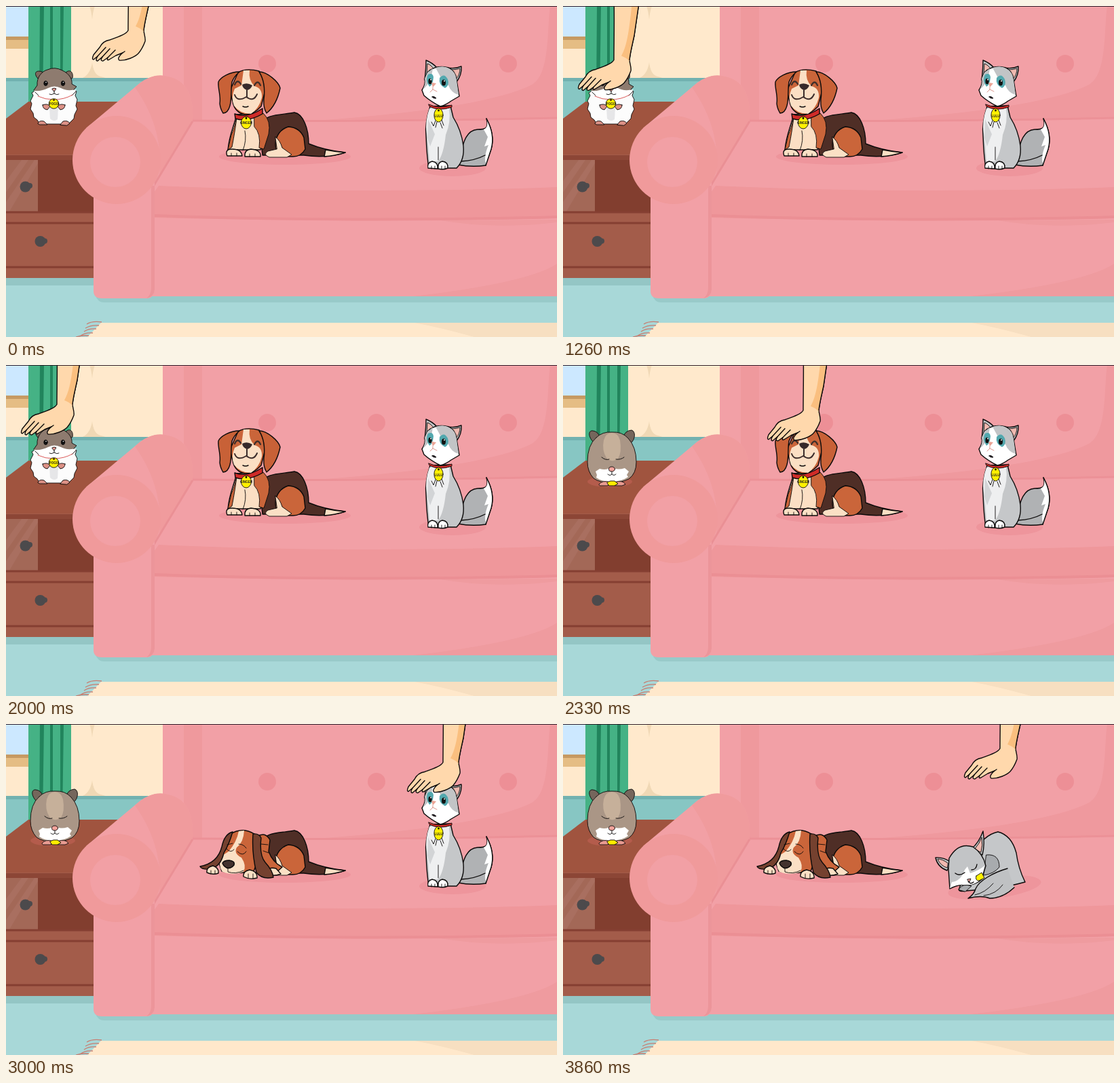
These frames come from a looping animation (812x488 px, 4800 ms). An HTML page:

```html
<!DOCTYPE html>
<html lang="en">
<head>
<meta charset="utf-8">
<title>Sleepy pets</title>
<style>
html, body { margin: 0; width: 100%; height: 100%; overflow: hidden; }
svg { display: block; width: 100%; height: 100%; }
.ink { stroke: #0c0a0a; stroke-width: 1.4; stroke-linejoin: round; stroke-linecap: round; }
.line { fill: none; }
.thin { stroke-width: .9; }
text { font: bold 4.6px Arial, "Liberation Sans", sans-serif; text-anchor: middle; fill: #222; stroke: none; }
</style>
</head>
<body>
<svg viewBox="0 0 812 488" preserveAspectRatio="none">
  <!-- Room -->
  <rect width="812" height="488" fill="#a8d8d8"/>
  <rect width="240" height="108" fill="#ffe9cc"/>
  <rect width="34" height="46" fill="#cce8ff"/>
  <rect y="45" width="34" height="18" fill="#e5bd84"/>
  <rect y="45" width="34" height="5" fill="#c69a63"/>
  <path d="M123 0H131Q128 8 127 20Q126 8 123 0ZM110 107Q124 103 127 83Q129 102 140 104L150 107Z" fill="#f0d8b5"/>
  <rect y="107" width="240" height="60" fill="#87c6c3"/>
  <rect y="106" width="240" height="5" fill="#72b2b0"/>
  <rect x="33" width="63" height="150" fill="#45b285"/>
  <path d="M50 0H56L54 141H49ZM65 0H69V141H65ZM80 0H85L83 141H80Z" fill="#21845c"/>
  <rect y="400" width="135" height="12" fill="#94c6c5"/>
  <path d="M132 427H812V437H145Q135 437 132 427Z" fill="#98cac9"/>
  <path d="M140 467H812V488H120Z" fill="#ffe8cb"/>
  <path d="M602 467H812V488H690Q640 474 602 467Z" fill="#f7dfc1"/>
  <path d="M141 466Q127 464 119 469M137 471Q125 470 117 475M133 476Q122 475 115 480M128 482Q116 481 109 487M122 486Q112 485 103 488" fill="none" stroke="#c77d70" stroke-width="1.3"/>

  <!-- Cabinet -->
  <path d="M0 166L33 141H170V220H0Z" fill="#a0543f"/>
  <rect y="219" width="135" height="182" fill="#a35c4a"/>
  <rect y="220" width="135" height="7" fill="#8c4636"/>
  <rect y="227" width="47" height="76" fill="#a36857"/>
  <path d="M0 258L23 227H33L0 275ZM0 289L42 227H47V232L5 303H0Z" fill="#a96f60"/>
  <rect x="47" y="227" width="88" height="76" fill="#823e2f"/>
  <path d="M0 304H135M0 320H135M0 385H135" stroke="#853f32" stroke-width="3"/>
  <g fill="#4c4a4c"><circle cx="28.500" cy="266.500" r="8"/><circle cx="35" cy="265" r="4"/><circle cx="50.500" cy="347" r="8"/><circle cx="57" cy="346.500" r="4"/></g>

  <!-- Sofa -->
  <path d="M231 0H812V428H210V170H231Z" fill="#f2a0a6"/>
  <path d="M262 0H289V168H262Z" fill="#ef999d"/>
  <path d="M812 0V165L470 168C600 158 720 143 775 116C802 101 797 35 802 0Z" fill="#ef999e"/>
  <path d="M275 169Q550 171 812 165" fill="none" stroke="#ec9197" stroke-width="3"/>
  <g fill="#ed8f96"><circle cx="385" cy="85" r="13"/><circle cx="546" cy="85" r="13"/><circle cx="740" cy="85" r="13"/></g>
  <path d="M225 265Q520 278 812 267V313Q520 320 218 312V275Z" fill="#ef979b"/>
  <path d="M218 309Q520 319 812 311" fill="none" stroke="#eb8f94" stroke-width="4"/>
  <path d="M812 380Q770 408 600 428H812Z" fill="#ef9b9f"/>
  <path d="M640 316Q720 330 812 319V315Z" fill="#ef9b9f"/>
  <path d="M118 180L198 113Q217 99 239 104Q278 112 275 169L216 267L150 290Z" fill="#f2a0a5"/>
  <path d="M190 120Q215 97 239 104Q278 112 275 169L226 250Q233 180 190 120Z" fill="#f09b9d"/>
  <path d="M275 170L217 266" stroke="#ea9095" stroke-width="3"/>
  <path d="M129 240H219V418Q218 431 207 431H141Q129 431 129 420Z" fill="#f2a0a6"/>
  <path d="M214 265H219V418Q218 429 207 431Q214 426 214 415Z" fill="#ec959a"/>
  <circle cx="163" cy="227" r="65" fill="#f09a9b"/>
  <circle cx="161" cy="230" r="37" fill="#f2a0a5"/>

  <!-- Hamster -->
  <g id="hamsterAwake" class="ink thin">
    <path d="M46 123L38 128L40 132L36 140L38 144L36 152L40 158L41 164L46 168L50 174H92L100 166L101 160L105 152L103 147L105 138L102 132L104 126L97 120Z" fill="#fcfcfc"/>
    <path d="M64 150H77L76 167Q70 172 65 166Z" fill="#e6e6e8" stroke="none"/>
    <path d="M47 107C40 99 44 94 53 97L58 104M86 101C91 92 100 95 98 106L93 110" fill="#7d6a5e"/>
    <path d="M41 124L46 117C45 105 53 96 61 94Q72 89 83 95C94 100 98 109 97 115L104 119L98 125Q90 132 71 133Q52 133 43 127Z" fill="#8e7b6f"/>
    <path d="M41 125Q53 126 62 121Q71 116 81 121Q89 126 104 123L96 132Q84 138 71 134Q55 138 45 131Z" fill="#fff" stroke="none"/>
    <path d="M71 126V129Q67 132 64 130M71 129Q75 132 78 130M43 127L48 132M103 126L97 132" class="line"/>
    <ellipse cx="58.500" cy="114" rx="2.700" ry="3.500" fill="#111"/><ellipse cx="84" cy="114" rx="2.700" ry="3.500" fill="#111"/>
    <circle cx="59" cy="112.500" r=".8" fill="#fff" stroke="none"/><circle cx="84.500" cy="112.500" r=".8" fill="#fff" stroke="none"/>
    <path d="M68 122Q71 120 74 122L71 126Z" fill="#ed9b94"/>
    <path d="M47 133Q58 138 70 138Q86 138 98 131" class="line" style="stroke:#d94a4a"/>
    <path d="M54 146Q61 143 65 148L61 153Q54 152 54 146ZM87 146Q80 143 76 148L80 153Q87 152 87 146ZM47 173Q49 168 56 170L61 175H50ZM80 175L84 170Q91 168 94 173L90 176Z" fill="#dc9186"/>
    <circle cx="70.500" cy="144" r="7.300" fill="#fff000"/><circle cx="70.500" cy="138.500" r="1" fill="#b52c26"/>
    <text x="70.500" y="146">POGO</text>
  </g>
  <g id="hamsterAsleep" class="ink thin">
    <ellipse cx="69" cy="172" rx="33" ry="8" fill="#b45c4c" stroke="none"/>
    <path d="M44 113C36 104 38 96 44 97Q52 98 54 106ZM89 106Q91 97 101 96C108 98 106 111 100 115Z" fill="#75665c"/>
    <path d="M49 107Q58 98 72 99Q87 98 96 108Q108 121 108 143Q108 160 97 168Q85 174 72 173Q54 174 45 167Q36 157 36 143Q36 118 49 107Z" fill="#aa9686"/>
    <path d="M60 111Q63 100 72 100Q81 100 84 111Q87 129 81 138Q73 145 64 137Q57 126 60 111Z" fill="#c6b09a" stroke="none"/>
    <path d="M50 162L48 157L54 153Q65 156 71 150Q79 156 91 152L97 157L94 162L96 165Q86 172 72 172Q57 172 49 166Z" fill="#fff" stroke="none"/>
    <path d="M53 176Q58 169 70 173L66 178H55ZM76 173Q88 169 92 176L87 178H76Z" fill="#e99b91"/>
    <path d="M65 173L70 171L76 171L81 175L76 178H68Z" fill="#ffec00"/>
    <path d="M57 136Q63 141 68 139M78 139Q85 140 90 136M72 156V161Q69 164 66 161M72 161Q75 164 78 161" class="line"/>
    <ellipse cx="72" cy="153.500" rx="4.500" ry="3.500" fill="#f2a29a"/>
  </g>

  <!-- Dog -->
  <ellipse cx="411" cy="222" rx="97" ry="12" fill="#ee959c"/>
  <g class="ink">
    <path d="M373 176C382 158 407 161 425 157C438 159 446 181 446 203Q470 213 500 216Q471 225 439 220H378Z" fill="#4f2e26"/>
    <path d="M471 212Q486 215 500 216Q485 221 469 222Z" fill="#fbe0c5"/>
    <path d="M397 205C397 190 406 181 416 178Q433 179 439 194L441 211Q435 222 423 222H400Z" fill="#ca653a"/>
    <path d="M397 193Q404 198 407 209L421 219L414 223H388Q378 219 386 214L399 211Z" fill="#fbe0c5" class="thin"/>
  </g>
  <g id="dogAwake" class="ink">
    <path d="M340 160C335 180 329 190 327 212H375L386 178L377 158Z" fill="#fbdfc4"/>
    <path d="M340 164Q336 182 332 190L327 212L333 208Q338 182 340 164ZM366 163L379 158Q391 169 387 189L380 211L373 209Q376 188 366 178Z" fill="#ca653a" class="thin"/>
    <path d="M326 221Q322 211 333 211Q347 211 348 221ZM352 222Q351 212 361 211Q376 212 375 222Z" fill="#fbe0c5"/>
    <path d="M332 217V221M340 217V221M359 218V222M367 218V222M349 213Q355 198 352 184" class="line thin"/>
    <path d="M337 159Q356 166 378 151L378 159Q356 172 338 166Z" fill="#cf2b28"/>
    <path d="M342 98Q354 91 373 96Q382 108 381 128L376 148Q365 160 352 160Q337 157 334 141L330 125Z" fill="#ca653a"/>
    <path d="M350 95L359 95Q357 109 366 118Q378 121 377 135Q373 151 361 159Q345 159 336 147Q331 135 337 122L347 117Z" fill="#fbdfc4" stroke="none"/>
    <path d="M344 97C330 97 316 105 313 112C312 122 317 132 315 144Q316 152 320 158Q327 158 330 147C333 136 331 122 333 112Q336 104 344 97ZM373 97C385 97 402 112 404 121C401 136 394 150 384 158Q379 150 380 138C382 122 380 108 373 97Z" fill="#c86137"/>
    <path d="M337 116Q341 107 346 115M366 117Q371 108 375 117" class="line" style="stroke:#41302b;stroke-width:2.300"/>
    <path d="M348 116Q355 112 363 117Q360 124 355 124Q349 122 348 116Z" fill="#36292a" stroke="none"/>
    <path d="M337 131Q341 142 354 134Q365 142 370 130M355 124V134" class="line" style="stroke:#3c2d2b;stroke-width:2"/>
    <path d="M349 148Q353 150 357 148" class="line"/>
    <ellipse cx="354" cy="172" rx="7.500" ry="9" fill="#fff000" class="thin"/><circle cx="354" cy="165.500" r=".7"/>
    <text x="354" y="174">GINGER</text>
  </g>
  <g id="dogAsleep" class="ink">
    <path d="M370 166Q382 158 389 171L387 188Q393 204 407 211L397 220H372Z" fill="#ca653a"/>
    <path d="M376 177L386 178M379 187L387 190" class="line thin"/>
    <path d="M384 219Q386 210 398 213L405 221Q395 225 384 222Z" fill="#fbe0c5"/>
    <path d="M330 163Q347 151 366 162L374 194L365 217Q338 222 318 217L313 203L321 182Z" fill="#ca653a"/>
    <path d="M343 158L351 157Q350 175 340 182Q335 191 347 197Q355 209 350 218Q334 224 319 218Q312 208 317 195L328 188Q340 174 343 158Z" fill="#fbe0c5" stroke="none"/>
    <path d="M334 159Q322 162 318 181Q312 205 286 210Q288 215 302 214Q317 209 321 190Q329 177 334 159ZM364 162Q373 161 376 168Q373 193 382 204Q393 216 394 226Q378 230 369 219Q362 190 364 162Z" fill="#75412f"/>
    <path d="M296 219Q295 211 305 209Q314 212 313 220Q305 223 296 219ZM350 225Q349 217 359 215Q371 217 370 227Q359 230 350 225Z" fill="#fbe0c5"/>
    <path d="M302 216V220M308 216V221M357 221V227M364 221V228M325 184Q331 191 336 185M341 188Q349 196 354 188M326 178L334 176M343 177Q350 177 354 183M327 210V218Q338 222 350 216" class="line thin"/>
    <path d="M319 205Q321 201 329 201Q338 202 336 208Q331 214 325 212Q320 209 319 205Z" fill="#43322e"/>
  </g>

  <!-- Cat -->
  <g id="catAwake" class="ink">
    <ellipse cx="658" cy="239" rx="49" ry="12" fill="#ee959c" stroke="none"/>
    <path d="M668 224C674 201 678 183 695 182C706 182 712 181 708 166Q721 190 715 211L707 235Q686 238 666 234Z" fill="#b0b2b4"/>
    <path d="M704 182Q712 178 708 166Q721 190 715 211L708 234Q703 224 711 205L705 207L710 193Z" fill="#fff" stroke="none"/>
    <path d="M670 229Q691 228 706 220M708 166Q721 190 715 211L707 235" class="line"/>
    <path d="M625 148Q617 173 619 191Q620 220 623 239H664Q676 227 674 206Q671 183 659 164L655 147Z" fill="#c5c7c9"/>
    <path d="M624 151H653Q656 171 648 190Q645 218 637 229H624Q623 208 620 188Q617 170 624 151Z" fill="#eeeff0" stroke="none"/>
    <path d="M622 167L632 189L625 207L621 194Z" fill="#d2d4d6" stroke="none"/>
    <path d="M637 208V227M627 171L630 177L633 169M633 179L635 171M640 172L643 180M642 168L645 176" class="line thin"/>
    <path d="M622 239Q620 231 628 229Q637 230 636 240ZM637 240Q636 230 643 229Q652 230 651 239Q644 242 637 240Z" fill="#fff"/>
    <path d="M627 236V240M632 236V240M642 236V240M647 236V240" class="line thin"/>
    <path d="M623 145Q638 152 657 146V149Q638 156 624 148Z" fill="#cf2b28" class="thin"/>
    <path d="M617 109Q619 92 619 80Q629 84 635 91ZM650 91Q662 93 671 89Q672 101 664 112Z" fill="#c2c4c6"/>
    <path d="M620 101L621 85Q627 87 630 93ZM656 94Q664 94 669 92Q669 102 663 108Z" fill="#f0b9b0" class="thin"/>
    <path d="M621 98Q633 86 652 91Q663 96 664 109L668 133L656 140Q648 146 640 148Q626 141 616 132L613 124Q619 115 617 107Z" fill="#fff"/>
    <path d="M633 91Q645 87 653 92Q663 97 664 109L667 131Q656 128 652 117Q643 112 639 102ZM621 98L629 92L627 104Q622 118 614 123Q619 115 617 107Z" fill="#c2c4c6" stroke="none"/>
    <path d="M622 101Q629 98 630 105Q629 117 624 119Q617 109 622 101ZM639 106Q646 98 651 108Q654 117 647 121Q637 116 639 106Z" fill="#52a8ae" stroke="none"/>
    <ellipse cx="625" cy="111" rx="2.600" ry="4.200" fill="#111" stroke="none"/><ellipse cx="645" cy="113" rx="3" ry="4.500" fill="#111" stroke="none"/>
    <circle cx="626" cy="108.500" r="1" fill="#fff" stroke="none"/><circle cx="646" cy="110.500" r="1" fill="#fff" stroke="none"/>
    <path d="M627 113L634 114L629 120Z" fill="#eba394" stroke="none"/>
    <path d="M629 120V123L625 127M629 123L635 126" class="line thin" style="stroke:#d98c80"/>
    <path d="M628 134Q630 132 634 136Q630 137 628 134Z" fill="#27212a" class="thin"/>
    <ellipse cx="637.500" cy="161" rx="6.600" ry="10" fill="#fff000" class="thin"/><circle cx="637.500" cy="154" r=".7"/>
    <text x="637.500" y="164">LULU</text>
  </g>
  <g id="catAsleep" class="ink">
    <ellipse cx="636" cy="241" rx="69" ry="16" fill="#ee959c" stroke="none" transform="rotate(-7 636 241)"/>
    <path d="M603 193Q620 163 641 159Q661 164 668 190Q671 213 681 233Q655 240 639 242L594 246Q581 248 584 242Z" fill="#c5c7c9"/>
    <path d="M624 193Q643 191 643 211Q635 221 620 223Z" fill="#a8abae" class="thin"/>
    <path d="M572 204Q561 196 549 197Q552 211 566 216ZM602 184Q613 175 619 158Q622 177 618 193Z" fill="#c2c4c6"/>
    <path d="M567 205Q559 199 552 199Q556 209 566 212ZM607 184Q614 176 617 167Q619 179 616 189Z" fill="#f0b9b0" class="thin"/>
    <path d="M569 198Q582 174 604 181Q619 191 623 209L617 229Q605 240 588 237Q579 238 570 243L568 213Z" fill="#c2c4c6"/>
    <path d="M570 242L573 233Q586 232 592 215L596 210L600 220Q613 216 621 209L617 227Q607 240 588 237Q579 237 570 242Z" fill="#fff" stroke="none"/>
    <path d="M578 220Q584 225 592 219M602 215Q609 215 610 207M597 232Q600 237 605 233" class="line"/>
    <path d="M596 229L601 228L599 233Z" fill="#f0a39a" class="thin"/>
    <path d="M609 224L617 219L621 227L613 231Q607 231 609 224Z" fill="#fff000" class="thin"/>
    <path d="M583 244Q589 234 602 239L593 247Z" fill="#a8abae" class="thin"/>
    <path d="M655 213C634 219 613 231 608 243Q606 251 597 257Q617 252 629 257Q648 257 665 241" fill="#bfc1c3"/>
    <path d="M634 235Q622 249 607 252M648 237Q638 251 620 253" class="line thin"/>
  </g>

  <!-- Hand -->
  <g id="hand" class="ink">
    <path d="M180-62C181-20 180 10 180 36C177 42 164 46 153 50C146 51 141 55 138 61L129 72Q126 79 129 79L135 74Q131 81 135 81L142 75Q138 81 143 81L150 76Q148 81 152 79L162 73L172 69Q163 77 167 80C177 81 190 75 195 70Q201 63 205 52C206 47 203 40 203 36C204 25 208 10 210 0L219-62Z" fill="#ffd8ac"/>
    <path d="M208-62C203-10 200 14 191 30Q199 33 203 38C204 25 208 10 210 0L219-62Z" fill="#fabf7f" stroke="none"/>
    <path d="M135 74L147 61M142 75L153 63M150 76L161 65M172 69L175 67M203 36C204 25 208 10 210 0L219-62" class="line"/>
  </g>

  <path d="M0 .5H812" stroke="#30222e"/>
</svg>
<script>
const LOOP = 4800, FPS = 15;
const REST = 0, HAMSTER = -105, DOG = 174, CAT = 464;
// [frame, x, y] of the hand: glides along one x, jumps when x changes.
const path = [
  [0, REST, 0],
  [12, HAMSTER, 12], [13, HAMSTER, 12], [18, HAMSTER, 54], [22, HAMSTER, 12],
  [23, HAMSTER, 12], [27, HAMSTER, 54], [30, HAMSTER, 22],
  [31, DOG, 0], [32, DOG, 0], [36, DOG, 41], [39, DOG, 10], [41, DOG, 29],
  [42, CAT, 0], [43, CAT, 0], [47, CAT, 41], [50, CAT, 10], [53, CAT, 41],
  [56, CAT, 10], [57, CAT, 10], [58, CAT, 0]
];
const bedtime = { hamster: 31, dog: 42, cat: 58 };
const el = id => document.getElementById(id);

function handAt(frame) {
  const i = path.findLastIndex(key => key[0] <= frame);
  const [start, x, y] = path[i];
  const next = path[i + 1];
  if (!next || next[1] !== x) return [x, y];
  return [x, y + (next[2] - y) * (frame - start) / (next[0] - start)];
}

function draw(now) {
  // The small lead absorbs rounding of frame times to 10 ms.
  const frame = Math.floor((now % LOOP + 7) * FPS / 1000) % (LOOP * FPS / 1000);
  el("hand").setAttribute("transform", `translate(${handAt(frame)})`);
  for (const pet in bedtime) {
    const asleep = frame >= bedtime[pet];
    el(pet + "Awake").style.display = asleep ? "none" : "";
    el(pet + "Asleep").style.display = asleep ? "" : "none";
  }
}

let begin;
function tick(now) {
  begin ??= now;
  draw(now - begin);
  requestAnimationFrame(tick);
}
draw(0);
requestAnimationFrame(tick);
</script>
</body>
</html>
```
